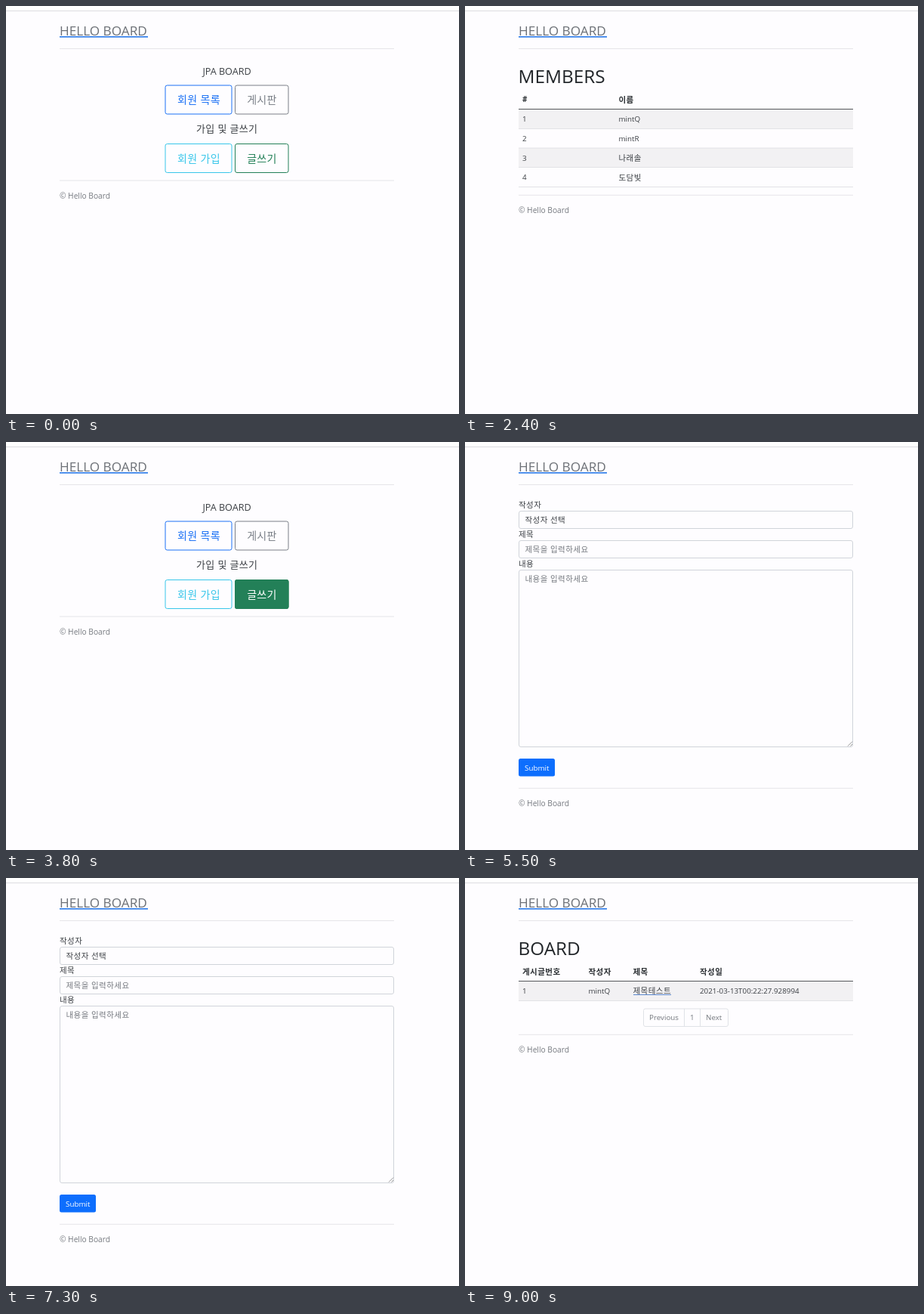
These frames come from a looping animation (600 by 540 pixels, 9.9 s). An HTML page:

```html
<!DOCTYPE html>
<html lang="ko">
<head>
<meta charset="utf-8">
<title>Hello Board</title>
<style>
  html, body { margin: 0; width: 100%; height: 100%; overflow: hidden; background: #fefdff; }
  svg { display: block; width: 600px; height: 540px; }
  text { font: 9.8px "Open Sans", "Noto Sans CJK KR", "Noto Sans CJK", sans-serif; fill: #3b3f44; }
  .ko { font-size: 10.5px; letter-spacing: .45px; }
  .bold { font-weight: 700; fill: #2b2f33; }
  .h1 { font-size: 24.3px; fill: #212529; }
  .muted { fill: #75797f; }
  .brand { font-size: 17.2px; fill: #6c7076; }
  .lead { font-size: 12.6px; text-anchor: middle; }
  .lead.ko { font-size: 13px; letter-spacing: .35px; }
  .hr { fill: #e6e5e9; }
  .stripe { fill: #f2f1f3; }
  .field { fill: #fefdff; stroke: #d0d4da; }

  .btn text { font-size: 14px; letter-spacing: .35px; text-anchor: middle; fill: var(--c); }
  .btn rect { fill: none; stroke: var(--c); }
  .btn .over { fill-opacity: 0; }
  .btn .over rect { fill: var(--c); stroke: none; }
  .btn .over text { fill: #fff; }
  .primary { --c: #1a70f5; }
  .secondary { --c: #7a7f87; }
  .info { --c: #38c6ea; }
  .success { --c: #238058; }

  .page, .popup { visibility: hidden; animation: 9900ms step-end infinite; }
  .home { animation-name: home; }
  .members { animation-name: members; }
  .form { animation-name: form; }
  .board { animation-name: board; }
  .popup { animation-name: popup; }
  .cursor { animation: cursor 9900ms step-end infinite; }
  .primary .over { animation: hover-list 9900ms linear infinite; }
  .success .over { animation: hover-write 9900ms linear infinite; }
  .secondary .over { animation: hover-board 9900ms linear infinite; }
  .ring { opacity: 0; animation: focus 9900ms linear infinite; }

  @keyframes home {
    0%, 32.323%, 75.757% { visibility: visible; }
    17.171%, 41.414%, 82.828%, 100% { visibility: hidden; }
  }
  @keyframes members {
    0%, 32.323%, 100% { visibility: hidden; }
    17.171% { visibility: visible; }
  }
  @keyframes form {
    0%, 75.757%, 100% { visibility: hidden; }
    41.414% { visibility: visible; }
  }
  @keyframes board {
    0% { visibility: hidden; }
    82.828%, 100% { visibility: visible; }
  }
  @keyframes popup {
    0%, 72.727%, 100% { visibility: hidden; }
    59.595% { visibility: visible; }
  }
  @keyframes cursor {
    0% { transform: none; }
    63.636% { transform: translateY(14.4px); }
    65.656% { transform: translateY(28.8px); }
    67.676% { transform: translateY(43.2px); }
    68.686%, 100% { transform: translateY(57.6px); }
  }
  @keyframes hover-list {
    0%, 9.05%, 17.18%, 100% { fill-opacity: 0; }
    10.6%, 17.17% { fill-opacity: 1; }
  }
  @keyframes hover-write {
    0%, 35.35%, 41.42%, 100% { fill-opacity: 0; }
    36.87%, 41.41% { fill-opacity: 1; }
  }
  @keyframes hover-board {
    0%, 79.1%, 82.84%, 100% { fill-opacity: 0; }
    80.6%, 82.83% { fill-opacity: 1; }
  }
  @keyframes focus {
    0%, 58.2%, 73.7%, 100% { opacity: 0; }
    59.7%, 72.2% { opacity: 1; }
  }
</style>
</head>
<body>
<svg viewBox="0 0 600 540">
  <defs>
    <g id="foot">
      <rect class="hr" x="71" y="-.5" width="443" height="1"/>
      <text class="muted" x="71" y="23.7" style="font-size:10.2px">© Hello Board</text>
    </g>
    <clipPath id="row"><rect class="cursor" x="72" y="116" width="441" height="14.4"/></clipPath>
  </defs>

  <rect width="600" height="6" fill="#fff"/>
  <rect y="6" width="600" height="1" fill="#dddce0"/>
  <text class="brand" x="71" y="39">HELLO BOARD</text>
  <rect x="71" y="40" width="117" height="1.6" fill="#2878e8"/>
  <rect class="hr" x="71" y="56" width="443" height="1"/>

  <g class="page home">
    <text class="lead" x="292.5" y="90.5">JPA BOARD</text>
    <g class="btn primary">
      <rect x="211" y="105" width="88" height="38" rx="2.5"/>
      <text x="255.5" y="129">회원 목록</text>
      <g class="over">
        <rect x="210.5" y="104.5" width="89" height="39" rx="3"/>
        <text x="255.5" y="129">회원 목록</text>
      </g>
    </g>
    <g class="btn secondary">
      <rect x="303.5" y="105" width="70.5" height="38" rx="2.5"/>
      <text x="339" y="129">게시판</text>
      <g class="over">
        <rect x="303" y="104.5" width="71.5" height="39" rx="3"/>
        <text x="339" y="129">게시판</text>
      </g>
    </g>
    <text class="lead ko" x="292.7" y="167.3">가입 및 글쓰기</text>
    <g class="btn info">
      <rect x="211" y="182.5" width="88" height="38" rx="2.5"/>
      <text x="255.5" y="206.5">회원 가입</text>
    </g>
    <g class="btn success">
      <rect x="303.5" y="182.5" width="70.5" height="38" rx="2.5"/>
      <text x="339" y="206.5">글쓰기</text>
      <g class="over">
        <rect x="303" y="182" width="71.5" height="39" rx="3"/>
        <text x="339" y="206.5">글쓰기</text>
      </g>
    </g>
    <use href="#foot" y="231"/>
  </g>

  <g class="page members">
    <text class="h1" x="70.5" y="101.5">MEMBERS</text>
    <text class="bold" x="76" y="127">#</text>
    <text class="ko bold" x="203.5" y="127.5">이름</text>
    <rect class="stripe" x="71" y="137" width="443" height="25"/>
    <rect class="stripe" x="71" y="188" width="443" height="25"/>
    <path d="M71 136.5H514" stroke="#55575c"/>
    <path d="M71 162.5H514M71 188H514M71 213.5H514M71 239.5H514" stroke="#e2e2e6"/>
    <text x="76" y="153.3">1</text><text x="203.5" y="153.3">mintQ</text>
    <text x="76" y="179">2</text><text x="203.5" y="179">mintR</text>
    <text x="76" y="204.7">3</text><text class="ko" x="203.5" y="205">나래솔</text>
    <text x="76" y="230.4">4</text><text class="ko" x="203.5" y="230.7">도담빛</text>
    <use href="#foot" y="250.3"/>
  </g>

  <g class="page form">
    <text class="ko" x="71" y="87.3">작성자</text>
    <rect class="field" x="71.5" y="91.5" width="442" height="23" rx="2.5"/>
    <g class="ring" fill="none">
      <rect x="69.5" y="89.5" width="446.5" height="27" rx="4" stroke="#c2dafe" stroke-width="3"/>
      <rect x="71.5" y="91.5" width="442" height="23" rx="2.5" stroke="#86b7fe"/>
    </g>
    <text class="ko" x="79.5" y="107">작성자 선택</text>
    <text class="ko" x="71" y="126.3">제목</text>
    <rect class="field" x="71.5" y="130.5" width="442" height="23" rx="2.5"/>
    <text class="ko muted" x="79.5" y="146">제목을 입력하세요</text>
    <text class="ko" x="71" y="165.3">내용</text>
    <rect class="field" x="71.5" y="169.5" width="442" height="234" rx="2.5"/>
    <text class="ko muted" x="79.5" y="185">내용을 입력하세요</text>
    <path d="M507 402.500L513 396.500M510.500 402.500L513 400" stroke="#777" stroke-width=".8"/>
    <rect x="71" y="419" width="48" height="23.5" rx="2.5" fill="#0d6efd"/>
    <text x="79" y="434.500" style="fill:#fff">Submit</text>
    <use href="#foot" y="458.300"/>
  </g>

  <g class="popup">
    <rect x="71.5" y="115.5" width="442" height="73" fill="#fff" stroke="#8a8a8e"/>
    <g>
      <text class="ko" x="79.5" y="127">작성자 선택</text>
      <text x="79.5" y="141.4">mintQ</text>
      <text x="79.5" y="155.8">mintR</text>
      <text class="ko" x="79.5" y="170.2">나래솔</text>
      <text class="ko" x="79.5" y="184.6">도담빛</text>
    </g>
    <g clip-path="url(#row)">
      <rect x="72" y="116" width="441" height="72" fill="#1e80f0"/>
      <g class="picked">
        <text class="ko" x="79.5" y="127" style="fill:#fff">작성자 선택</text>
        <text x="79.5" y="141.4" style="fill:#fff">mintQ</text>
        <text x="79.5" y="155.8" style="fill:#fff">mintR</text>
        <text class="ko" x="79.5" y="170.2" style="fill:#fff">나래솔</text>
        <text class="ko" x="79.5" y="184.6" style="fill:#fff">도담빛</text>
      </g>
    </g>
  </g>

  <g class="page board">
    <text class="h1" x="70.5" y="101.5">BOARD</text>
    <text class="ko bold" x="76" y="127.5">게시글번호</text>
    <text class="ko bold" x="163.5" y="127.5">작성자</text>
    <text class="ko bold" x="222.5" y="127.5">제목</text>
    <text class="ko bold" x="311" y="127.5">작성일</text>
    <rect class="stripe" x="71" y="137" width="443" height="25"/>
    <path d="M71 136.5H514" stroke="#55575c"/>
    <path d="M71 162.5H514" stroke="#e2e2e6"/>
    <text x="76" y="153.3">1</text>
    <text x="163.5" y="153.3">mintQ</text>
    <text class="ko" x="222.5" y="153.3">제목테스트</text>
    <rect x="223" y="154" width="50" height="1" fill="#5a86cc"/>
    <text x="311" y="153.3">2021-03-13T00:22:27.928994</text>
    <rect class="field" x="236.500" y="173" width="112" height="23.500" rx="2.500" style="stroke:#e0e2e7"/>
    <path d="M290.5 173V196.5M311.500 173V196.5" stroke="#e0e2e7"/>
    <text class="muted" x="244" y="188.300">Previous</text>
    <text class="muted" x="298" y="188.300">1</text>
    <text class="muted" x="319" y="188.300">Next</text>
    <use href="#foot" y="207.300"/>
  </g>
</svg>
</body>
</html>
```
